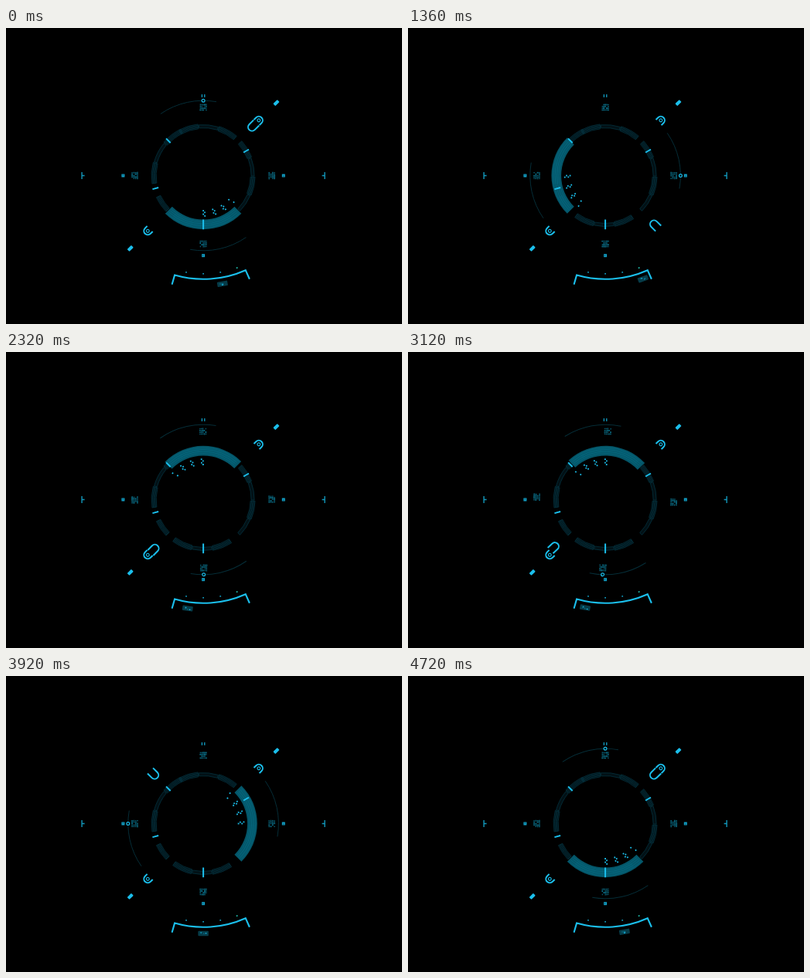
An HTML page with a canvas that plays this animation: 512x384 px, repeating every 4.76 s.

```html
<!DOCTYPE html>
<html lang="en">
<head>
<meta charset="utf-8">
<title>HUD dial</title>
<style>
html, body { margin: 0; width: 100%; height: 100%; overflow: hidden; background: #000; }
canvas { display: block; }
</style>
</head>
<body>
<canvas id="stage" width="512" height="384"></canvas>
<script>
const ctx = document.getElementById('stage').getContext('2d');
const LOOP = 4760, STEP = 40, RAD = Math.PI / 180;
const BRIGHT = '#1bbfec', SOFT = '#12a0c6', MID = '#0a6a82', DIM = '#05323e';
// Resting angles of the labels under the lower bracket, one per quarter turn
const TAG_ANGLES = [10, 20, -8.5, 0];

function random(seed) {
  return () => (seed = (seed * 16807) % 2147483647) / 2147483647;
}

function turned(deg, draw) {
  ctx.save();
  ctx.rotate(deg * RAD);
  draw();
  ctx.restore();
}

function stroke(color, width, path) {
  ctx.strokeStyle = color;
  ctx.lineWidth = width;
  ctx.beginPath();
  path();
  ctx.stroke();
}

// Angles run clockwise from the top
function arc(r, from, to, back) {
  ctx.arc(0, 0, r, (from - 90) * RAD, (to - 90) * RAD, back);
}

function band(color, r0, r1, from, to) {
  ctx.fillStyle = color;
  ctx.beginPath();
  arc(r1, from, to);
  arc(r0, to, from, true);
  ctx.fill();
}

function box(color, x, y, w, h) {
  ctx.fillStyle = color;
  ctx.fillRect(x - w / 2, y - h / 2, w, h);
}

function roundBox(color, x, y, w, h) {
  ctx.fillStyle = color;
  ctx.beginPath();
  ctx.roundRect(x - w / 2, y - h / 2, w, h, 1);
  ctx.fill();
}

function line(x1, y1, x2, y2) {
  ctx.moveTo(x1, y1);
  ctx.lineTo(x2, y2);
}

function spoke(color, width, deg, r0, r1) {
  turned(deg, () => stroke(color, width, () => line(0, -r0, 0, -r1)));
}

function circle(y, r, width) {
  stroke(BRIGHT, width, () => ctx.arc(0, y, r, 0, 7));
}

// U shape with its closed end centred on y and its legs ending at legY
function clasp(y, legY) {
  stroke(BRIGHT, 2, () => {
    ctx.moveTo(-5, legY);
    ctx.arc(0, y, 5, Math.PI, 0, legY < y);
    ctx.lineTo(5, legY);
  });
}

// Four quarter turns, each with a slow start and a longer settle
function wheelAngle(t) {
  let turns = 0;
  for (let k = 0; k < 4; k++) {
    const d = t - 918 - 1170 * k;
    const u = Math.min(1, Math.abs(d) / (d < 0 ? 300 : 370));
    const tail = (1 - u) ** 5 / 2;
    turns += d < 0 ? tail : 1 - tail;
  }
  return turns * 90;
}

function drawCode(seed) {
  const rnd = random(seed * 7919 + 31);
  for (let row = 0; row < 4; row++) {
    for (let col = 0; col < 5; col++) {
      const w = 1.1 + rnd(), h = 1.2 + rnd();
      if (rnd() < .8) box(MID, col * 1.9 - 3.8, row * 2.3 - 92, w, h);
    }
  }
}

function drawTag(seed) {
  const rnd = random(seed * 613 + 97);
  roundBox('#063c49', 0, 142.5, 13.5, 6.5);
  for (let i = 0; i < 5; i++) {
    box(i % 2 ? BRIGHT : MID, rnd() * 7 - 3, 141 + rnd() * 3, 1.6, 1.3);
  }
}

// Each group is split evenly into blocks, outlined and hatched in turn
function drawRing() {
  const groups = [[-28, 41], [48, 135], [147, 217], [226, 246], [261, 335]];
  for (const [from, to] of groups) {
    const count = Math.round((to - from) / 24), span = (to - from) / count;
    for (let i = 0; i < count; i++) {
      const a = from + i * span, b = a + span - 1;
      const r0 = 61 + i % 2, r1 = 67 - i % 2, gap = i % 2 ? 4 : 1.5;
      band('rgba(5, 50, 62, .35)', r0, r1, a, b);
      for (let r = r0; r <= r1; r += gap) stroke(DIM, .8, () => arc(r, a, b));
      for (const end of [a, b]) spoke(DIM, .8, end, r0, r1);
    }
  }
}

// Zigzag clusters of sparks inside the lit band, thinning out at its end
function drawSparks() {
  for (let k = 0; k < 4; k++) {
    for (let j = 0; j < 4; j += k < 3 ? 1 : 3) {
      turned(-15.5 * k - 2.3 * (j % 2), () => box(BRIGHT, 0, 45.5 + 2.3 * j, 1.8, 1.8));
    }
  }
}

function drawWheel() {
  band('rgba(5, 98, 120, .88)', 57, 69.7, 135, 225);
  for (let r = 60; r < 69; r += 2.5) {
    stroke('rgba(14, 135, 160, .4)', .7, () => arc(r, 137, 223));
  }
  drawSparks();
  for (const a of [0, 180]) stroke('#052d37', 1, () => arc(97.3, a - 34.6, a + 10));
  for (let i = 0; i < 4; i++) turned(i * 90, () => drawCode(i + 1));
  turned(45, () => clasp(-89, -97));
  box('#000', 0, -97.3, 3, 3);
  circle(-97.3, 1.9, 1.2);
}

function drawTags(angle) {
  ctx.save();
  ctx.beginPath();
  arc(152, 155, 196.5);
  arc(136, 196.5, 155, true);
  ctx.clip();
  TAG_ANGLES.forEach((rest, i) => turned(angle - 90 * i - rest, () => drawTag(i + 1)));
  ctx.restore();
}

function drawBracket() {
  stroke(BRIGHT, 2.1, () => {
    arc(147, 156, 156);
    arc(134.3, 156, 196);
    arc(147, 196, 196);
  });
  for (let a = -20; a <= 10; a += 10) {
    turned(a, () => box(a < -10 ? '#20c4b4' : SOFT, 0, 127.3, 1.8, 1.5));
  }
}

function drawFixed() {
  for (const a of [60, 255, 315]) spoke(BRIGHT, 2, a, 60, 68);
  spoke(BRIGHT, 2, 180, 57, 69.7);
  for (const a of [45, 225]) {
    turned(a, () => {
      clasp(-101.5, -97.5);
      circle(-101.5, 1.9, 1.1);
      roundBox(BRIGHT, 0, -133.5, 4.2, 7.6);
    });
  }
  for (const a of [90, 180, 270]) {
    turned(a, () => {
      box(SOFT, 0, -103.7, 4, 4);
      box('#075064', .5, -103.7, 1.3, 1.3);
    });
  }
  for (const x of [-1.7, 1.7]) box(SOFT, x, -103.5, 1.3, 3.8);
}

function drawSideMarks() {
  for (const a of [90, 270]) {
    turned(a, () => stroke('#1298bb', 1.4, () => {
      line(-4.5, -157, 4.5, -157);
      line(0, -157, 0, -153.5);
    }));
  }
}

function render(now) {
  const frame = Math.floor((now % LOOP) / STEP);
  const angle = wheelAngle(frame * STEP);
  ctx.setTransform(1, 0, 0, 1, 0, 0);
  ctx.fillStyle = '#000';
  ctx.fillRect(0, 0, 512, 384);
  ctx.translate(255.1, 191.5);
  drawRing();
  turned(angle, drawWheel);
  drawTags(angle);
  drawBracket();
  drawFixed();
  if (frame % 2 === 0) drawSideMarks();
}

const start = performance.now();
function tick() {
  render(performance.now() - start);
  requestAnimationFrame(tick);
}
tick();
</script>
</body>
</html>
```
